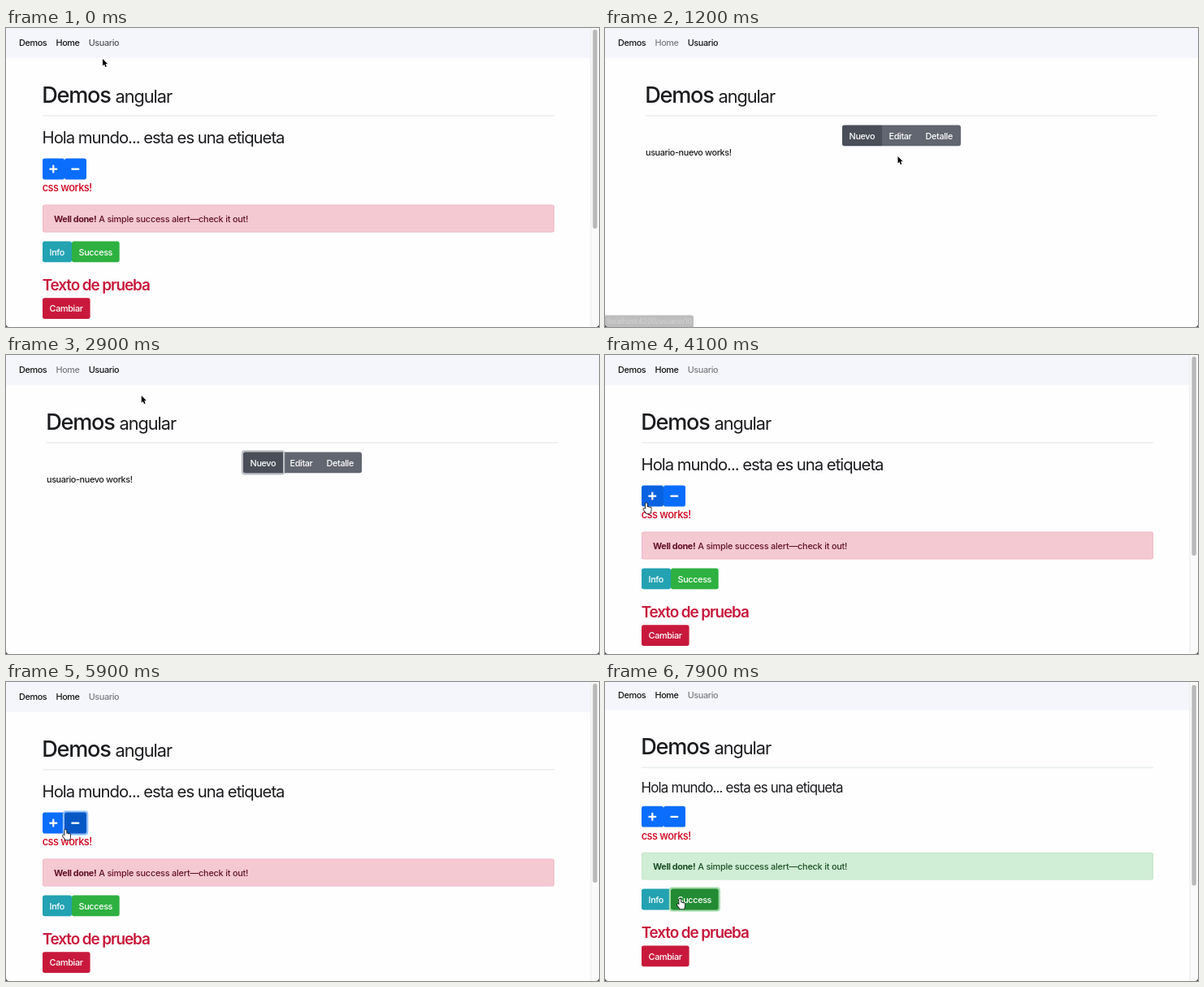
Animation of 730 by 368 pixels, one loop 8000 ms. Source, as an HTML page with a canvas:

```html
<!DOCTYPE html>
<html lang="es">
<head>
<meta charset="utf-8">
<title>Demos angular</title>
<style>
  html, body { margin: 0; width: 100%; height: 100%; overflow: hidden; background: #fff; }
  canvas { display: block; width: 730px; height: 368px; }
</style>
</head>
<body>
<canvas id="stage" width="730" height="368"></canvas>
<script>
const ctx = document.getElementById('stage').getContext('2d');
const W = 730, H = 368, LOOP = 8000, STEP = 100, GLIDE = 350;
const REM = 0.677; // page zoom
const BODY = 16 * REM, INK = '#1b1c1f';

const ARROW = new Path2D('M0 0V9.2L2.1 7.3 3.6 10.8 5.2 10.1 3.7 6.7H6.6Z');
const HAND = new Path2D('M2.6 7V1.2a.9.9 0 0 1 1.8 0V5a.8.8 0 0 1 1.6.2a.8.8 0 0 1 1.5.3' +
  'a.7.7 0 0 1 1.3.5V8.5L8 11.5H3.6L.5 7.6a.9.9 0 0 1 1.3-1.2z');

// one user session: time, pointer place, what is clicked there
const SESSION = [
  [0, 119, 38],
  [800, 121, 20, 'Usuario'],
  [1500, 360.5, 158],
  [1900, 364, 134, 'Editar'],
  [2300, 410, 134, 'Detalle'],
  [2800, 318, 120, 'Nuevo'],
  [3700, 80, 10, 'Home'],
  [4200, 51, 182],
  [4600, 55.5, 177, 'plus'],
  [4800, 55.5, 177, 'plus'],
  [5600, 73.5, 181.5, 'minus'],
  [5800, 73.5, 181.5, 'minus'],
  [6100, 73.5, 181.5, 'minus'],
  [6600, 73.5, 181.5],
  [6900, 66, 266.5, 'scroll'],
  [7600, 92.5, 266.5, 'Success']
];
const TABS = ['Nuevo', 'Editar', 'Detalle'];

const tone = (base, hover, focus, ring) => ({ base, hover, focus, ring });
const BLUE = tone('#0a6dfc', '#0962e0', '#0758c5', '#8fbdfb');
const TEAL = tone('#23a2b2', '#1c8a98', '#1a808d', '#9bd5dc');
const GREEN = tone('#2eb141', '#259637', '#238b33', '#a3dcab');
const RED = tone('#c8193c', '#ac1533', '#a31430', '#e8a0ae');
const GRAY = tone('#616670', '#555a63', '#494e58', '#bcbfc4');
const PRESSED = tone('#494e58', '#494e58', '#494e58', '#bcbfc4');

let mouse, hot, state;

// the pointer sets off after each stop and slows down towards the next
function pointerAt(t) {
  const next = SESSION.findIndex(s => s[0] > t);
  const i = next < 0 ? SESSION.length - 1 : next;
  const [start, x0, y0] = SESSION[i - 1], [, x1, y1] = SESSION[i];
  const u = 1 - (1 - Math.min(1, (t - start) / GLIDE)) ** 3;
  return { x: x0 + (x1 - x0) * u, y: y0 + (y1 - y0) * u };
}

function stateAt(t) {
  const s = { page: 'Home', tab: 'Nuevo', px: 30, focus: '', scroll: 0, won: false };
  for (const [time, , , act] of SESSION) {
    if (time > t || !act) continue;
    if (act === 'scroll') { s.scroll = 2.7; continue; }
    s.focus = act;
    if (act === 'Home' || act === 'Usuario') s.page = act;
    if (TABS.includes(act)) s.tab = act;
    if (act === 'plus') s.px += 5;
    if (act === 'minus') s.px -= 5;
    if (act === 'Success') s.won = true;
  }
  return s;
}

const inside = (x, y, w, h) =>
  mouse.x >= x && mouse.x < x + w && mouse.y >= y && mouse.y < y + h;

function over(x, y, w, h) {
  const hit = inside(x, y, w, h);
  hot = hot || hit;
  return hit;
}

function shift(dy) {
  ctx.translate(0, dy);
  mouse.y -= dy;
}

function rect(x, y, w, h, color) {
  ctx.fillStyle = color;
  ctx.fillRect(x, y, w, h);
}

function round(x, y, w, h, r, color) {
  ctx.beginPath();
  ctx.roundRect(x, y, w, h, r);
  ctx.fillStyle = color;
  ctx.fill();
}

// draws a line of text and returns its right edge
function text(str, x, y, size, color, weight = 450, track = -0.034) {
  ctx.font = `${weight} ${size}px Inter, "Open Sans", sans-serif`;
  ctx.letterSpacing = track * size + 'px';
  ctx.fillStyle = color;
  ctx.fillText(str, x, y);
  return x + ctx.measureText(str).width;
}

function button(x, y, w, label, color, name = label, radius = 2.7) {
  const h = 25.8, focused = state.focus === name, hover = over(x, y, w, h);
  if (focused) round(x - 2.2, y - 2.2, w + 4.4, h + 4.4, 4, color.ring);
  round(x, y, w, h, radius, focused ? color.focus : hover ? color.hover : color.base);
  text(label, x + 8.6, y + 17.1, BODY, '#fff');
}

// draws the focused one last so that its ring stays on top
function group(names, draw) {
  const rest = names.filter(n => n !== state.focus);
  [...rest, ...names.filter(n => n === state.focus)].forEach(draw);
}

function icon(x, y, plus) {
  round(x - 5, y - 1.1, 10, 2.2, .8, '#fff');
  if (plus) round(x - 1.1, y - 5, 2.2, 10, .8, '#fff');
}

function nav() {
  rect(0, 0, W, 37, '#f5f6fb');
  const link = (str, x, w) => {
    over(x - 4, 7, w + 8, 24);
    const near = inside(x - 4, 5, w + 8, 35);
    text(str, x, 22.2, BODY, state.page === str ? '#151517' : near ? '#55565a' : '#7b7c80');
  };
  text('Demos', 16, 22.2, BODY, '#151517');
  link('Home', 61.5, 30);
  link('Usuario', 101.7, 38);
}

function title(x) {
  const end = text('Demos', x - .8, 91.6, 40 * REM, INK, 500, -0.045);
  text('angular', end + 6, 91.6, 32 * REM, INK, 400, -0.047);
  rect(x, 107.4, 630, 1, '#e2e6e7');
}

function homePage() {
  const { px, won, scroll } = state;
  const size = px * REM, grow = 1.5 * (px - 30) * REM;
  ctx.save();
  shift(-scroll);
  nav();
  title(45);
  text('Hola mundo... esta es una etiqueta', 44.6, 119.5 + 1.13 * size, size, INK, 400, -0.05);

  shift(grow);
  group(['plus', 'minus'], name => {
    const x = name === 'plus' ? 45 : 72;
    button(x, 160.6, 27, '', BLUE, name);
    icon(x + 13.3, 173.6, name === 'plus');
  });
  text('css works!', 44.7, 201.4, 19 * REM, '#d0021b', 500, -0.04);

  round(45, 217.6, 630, 33.8, 2.7, won ? '#bfe3c5' : '#efb4c0');
  round(45.7, 218.3, 628.6, 32.4, 2, won ? '#d0edd5' : '#f4c9d2');
  const ink = won ? '#1d5127' : '#641226';
  const end = text('Well done!', 59, 238.6, BODY, ink, 700);
  text('A simple success alert—check it out!', end + 3, 238.6, BODY, ink, 450, -0.018);

  group(['Info', 'Success'], name =>
    name === 'Info' ? button(45, 262.4, 36, name, TEAL) : button(81, 262.4, 58.7, name, GREEN));
  text('Texto de prueba', 44.7, 322.9, 28 * REM, '#c8193c', 600, -0.058);
  button(45, 332.2, 58.6, 'Cambiar', RED);
  shift(scroll - grow);
  ctx.restore();

  rect(720, 0, 10, H, '#fafafa');
  rect(719.5, 0, 1, H, '#e9e9ea');
  round(722.4, 2 + scroll * .6, 5.4, 245 + (30 - px) * .4, 2.7, '#b9b9ba');
}

function userPage() {
  nav();
  title(50);
  const edge = [292, 341, 386, 438];
  group(TABS, name => {
    const i = TABS.indexOf(name), left = i === 0 ? 2.7 : 0, right = i === 2 ? 2.7 : 0;
    button(edge[i], 119.5, edge[i + 1] - edge[i], name,
      name === state.tab ? PRESSED : GRAY, name, [left, right, right, left]);
  });
  text(`usuario-${state.tab.toLowerCase()} works!`, 50, 157.2, BODY, INK);
}

// link address, fading out after the pointer has left the menu
function statusBar(t) {
  if (t < 400 || t > 1300) return;
  ctx.globalAlpha = Math.min(1, (1300 - t) / 280);
  round(-3, 353.5, 112, 18, 3, '#464646');
  text('localhost:4200/usuario/10', 3, 364, 8.6, '#fff', 400, -0.01);
  ctx.globalAlpha = 1;
}

function corners() {
  ctx.save();
  ctx.beginPath();
  ctx.rect(0, H - 20, W, 20);
  ctx.roundRect(0, H - 20, W, 20, [0, 0, 4, 4]);
  ctx.clip('evenodd');
  rect(0, H - 4, W, 4, '#3c3c3e');
  ctx.restore();
}

function cursor() {
  ctx.save();
  ctx.translate(mouse.x - (hot ? 4 : 0), mouse.y);
  ctx.scale(hot ? 1.1 : .93, hot ? 1.1 : .93);
  ctx.lineJoin = 'round';
  ctx.lineWidth = hot ? 1.5 : 1.2;
  ctx.strokeStyle = hot ? '#111' : '#fff';
  ctx.fillStyle = hot ? '#fff' : '#000';
  const shape = hot ? HAND : ARROW;
  ctx.stroke(shape);
  ctx.fill(shape);
  ctx.restore();
}

function frame(now) {
  const t = Math.floor(now % LOOP / STEP) * STEP;
  mouse = pointerAt(t);
  state = stateAt(t);
  hot = false;
  rect(0, 0, W, H, '#fefefe');
  state.page === 'Home' ? homePage() : userPage();
  statusBar(t);
  corners();
  cursor();
  requestAnimationFrame(frame);
}
requestAnimationFrame(frame);
</script>
</body>
</html>
```
